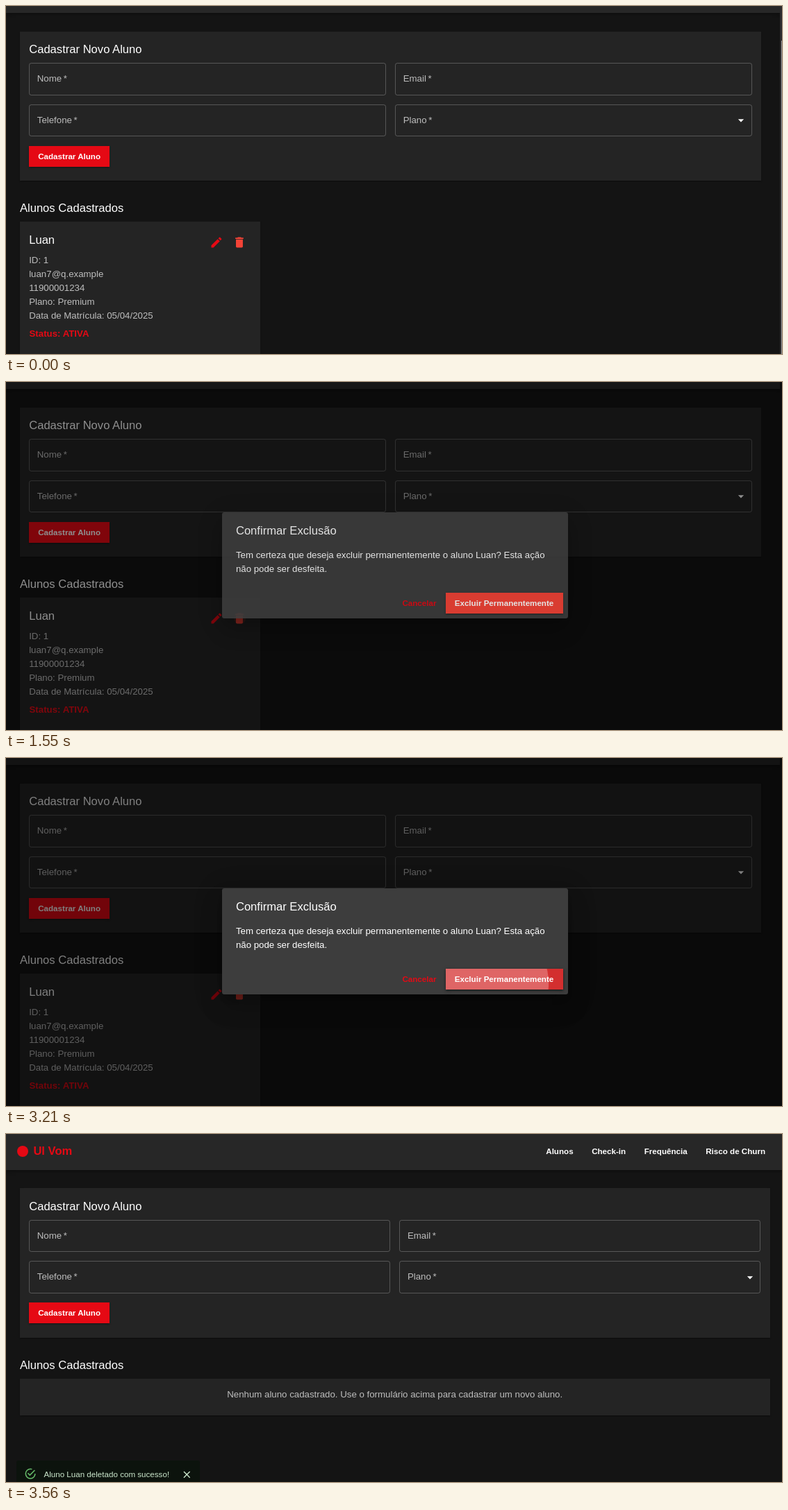
Write an HTML page that moves like this. It is 1117 px wide and 502 px high and loops after 6.09 s.

```html
<!DOCTYPE html>
<html lang="pt-BR">
<head>
<meta charset="utf-8">
<title>Cadastro de alunos</title>
<style>
  html, body { margin: 0; width: 100%; height: 100%; overflow: hidden; background: #141414; }
  body { position: relative; color: #fff; font: 13.28px/20px Arial, "Liberation Sans", sans-serif; }
  div, svg, .abs { position: absolute; white-space: pre; }
  svg { fill: currentColor; width: 19.92px; height: 19.92px; }
  [hidden] { display: none !important; }

  #page { left: 0; top: 0; width: 1113.5px; height: 600px; }
  .bar { left: 0; right: 0; top: 0; height: 51.5px; background: #272727;
    box-shadow: 0 1.7px 3.3px -.8px rgba(0,0,0,.2), 0 3.3px 4.2px rgba(0,0,0,.14), 0 .8px 8.3px rgba(0,0,0,.12); }
  .mark { left: 15.5px; top: 17px; width: 16px; height: 16px; border-radius: 50%; background: #e50914; }
  .brand { left: 39.4px; top: 15px; font-size: 16.6px; font-weight: bold; color: #e50914; }
  nav { position: absolute; right: 33px; top: 15px; display: flex; gap: 26.56px; white-space: pre; }
  nav, .btn, .flat { font-size: 11.62px; font-weight: bold; }
  .paper { left: 19.92px; right: 26.5px; background: #242424;
    box-shadow: 0 1.7px .8px -.8px rgba(0,0,0,.2), 0 .8px .8px rgba(0,0,0,.14), 0 .8px 2.5px rgba(0,0,0,.12); }
  .h6 { font-size: 16.6px; line-height: 26px; }
  .grid { left: 13.28px; right: 13.28px; top: 45.6px; display: grid;
    grid-template-columns: 1fr 1fr; gap: 13.28px; }
  .field { position: relative; box-sizing: border-box; height: 46.5px; border: 1px solid rgba(255,255,255,.23);
    border-radius: 3.3px; padding-left: 10.6px; line-height: 44px; color: rgba(255,255,255,.7); }
  .field i { font-style: normal; margin-left: .2em; }
  .field svg { right: 4.8px; top: 12.3px; color: #fff; }
  .btn { height: 30.3px; line-height: 30px; padding: 0 13px; background: #e50914;
    box-shadow: 0 2.5px .8px -1.7px rgba(0,0,0,.2), 0 1.7px 1.7px rgba(0,0,0,.14), 0 .8px 4.2px rgba(0,0,0,.12); }
  .soft { color: rgba(255,255,255,.7); }
  .round { width: 33.2px; height: 33.2px; border-radius: 50%; overflow: hidden; }
  .round svg { left: 6.64px; top: 6.64px; }
  .wave { border-radius: 50%; background: currentColor; opacity: 0; }

  #track { left: 1113.5px; top: 0; width: 12.5px; height: 100%; background: #2c2c2c; }
  #track div { left: 2.5px; top: 50px; width: 7px; bottom: 0; background: #9f9f9f; }
  #shade { inset: 0; background: rgba(0,0,0,.5); }
  #dialog { left: 311px; top: 188px; width: 497.5px; height: 153px; border-radius: 3.3px; background: #3d3d3d;
    box-shadow: 0 9.1px 12.5px -5.8px rgba(0,0,0,.2), 0 20px 31.5px 2.5px rgba(0,0,0,.14), 0 7.5px 38px 6.6px rgba(0,0,0,.12); }
  #del { left: 322px; top: 116px; width: 169px; padding: 0; overflow: hidden; }
  #lift { left: 322px; top: 116px; width: 169px; height: 30.3px;
    box-shadow: 0 1.7px 3.3px -.8px rgba(0,0,0,.2), 0 3.3px 4.2px rgba(0,0,0,.14), 0 .8px 8.3px rgba(0,0,0,.12); }
  #snack { left: 15px; top: 471px; width: 264px; height: 39px; border-radius: 3.3px;
    background: #0c130d; color: #cce8cd; font-size: 11.62px; }
</style>
</head>
<body>
<div id="page">
  <div class="bar">
    <div class="mark"></div>
    <div class="brand">Ul Vom</div>
    <nav><span>Alunos</span><span>Check-in</span><span>Frequência</span><span>Risco de Churn</span></nav>
  </div>
  <div class="paper" style="top:78px;height:215.5px">
    <div class="h6" style="left:13.28px;top:13.5px">Cadastrar Novo Aluno</div>
    <div class="grid">
      <span class="field">Nome<i>*</i></span>
      <span class="field">Email<i>*</i></span>
      <span class="field">Telefone<i>*</i></span>
      <span class="field">Plano<i>*</i><svg viewBox="0 0 24 24"><path d="M7 10l5 5 5-5z"/></svg></span>
    </div>
    <div class="btn" style="left:13.28px;top:165.2px">Cadastrar Aluno</div>
  </div>
  <div class="h6" style="left:19.92px;top:320.5px">Alunos Cadastrados</div>

  <div class="paper" id="card" style="top:352.5px;width:346.5px;height:200px">
    <div class="h6" style="left:13.28px;top:14px">Luan</div>
    <div class="soft" style="left:13.28px;top:46px;line-height:19.92px">ID: 1
luan7@q.example
11900001234
Plano: Premium
Data de Matrícula: 05/04/2025</div>
    <div style="left:13.6px;top:152px;font-weight:bold;color:#e50914">Status: ATIVA</div>
    <div class="round" style="left:266.6px;top:13.3px;color:#e50914">
      <svg viewBox="0 0 24 24"><path d="M3 17.25V21h3.75L17.81 9.94l-3.75-3.75zM20.71 7.04c.39-.39.39-1.02 0-1.41l-2.34-2.34a.996.996 0 0 0-1.41 0l-1.83 1.83 3.75 3.75z"/></svg>
    </div>
    <div class="round" id="trash" style="left:299.9px;top:13.3px;color:#f44336">
      <svg viewBox="0 0 24 24"><path d="M6 19c0 1.1.9 2 2 2h8c1.1 0 2-.9 2-2V7H6zM19 4h-3.5l-1-1h-5l-1 1H5v2h14z"/></svg>
      <div class="wave" id="tap" style="inset:0"></div>
    </div>
  </div>

  <div class="paper" id="empty" style="top:352.5px;height:53px">
    <div class="soft" style="left:0;right:0;top:13.3px;text-align:center">Nenhum aluno cadastrado. Use o formulário acima para cadastrar um novo aluno.</div>
  </div>
</div>
<div id="track"><div></div></div>

<div id="shade"></div>
<div id="dialog">
  <div class="h6" style="left:19.92px;top:13.5px">Confirmar Exclusão</div>
  <div id="ask" style="left:19.92px;top:52px"></div>
  <div class="flat" style="left:259.4px;top:121px;color:#e50914">Cancelar</div>
  <div id="lift"></div>
  <div class="btn" id="del">
    <div class="wave" id="ripple" style="left:-52px;top:-91px;width:224px;height:224px"></div>
    <div style="left:12.7px;top:0">Excluir Permanentemente</div>
  </div>
</div>

<div id="snack">
  <svg viewBox="0 0 24 24" style="left:11.4px;top:10.4px;width:18.2px;height:18.2px;color:#66bb6a"><path d="M20,12A8,8 0 0,1 12,20A8,8 0 0,1 4,12A8,8 0 0,1 12,4C12.76,4 13.5,4.11 14.2,4.31L15.77,2.74C14.61,2.26 13.34,2 12,2A10,10 0 0,0 2,12A10,10 0 0,0 12,22A10,10 0 0,0 22,12M7.91,10.08L6.5,11.5L11,16L21,6L19.59,4.58L11,13.17L7.91,10.08Z"/></svg>
  <div style="left:39.4px;top:9.5px">Aluno Luan deletado com sucesso!</div>
  <svg viewBox="0 0 24 24" style="left:237.2px;top:11.7px;width:16.6px;height:16.6px"><path d="M19 6.41L17.59 5 12 10.59 6.41 5 5 6.41 10.59 12 5 17.59 6.41 19 12 13.41 17.59 19 19 17.59 13.41 12z"/></svg>
</div>

<script>
const LOOP = 6090;
// Moments at which the picture is refreshed; it holds still in between.
const TICKS = [0, 810, 1410, 1480, 1550, 1620, 1690, 1760, 2660, 2730, 2800, 2870,
  3000, 3070, 3140, 3210, 3280, 3350, 3420, 3490, 3560];
const OPEN = 1412, CLOSE = 3225, DELETED = 3284, UNLOCK = 3490;
const ASK = 'Tem certeza que deseja excluir permanentemente o aluno ';
const $ = id => document.getElementById(id);
const mix = (a, b, p) => a + (b - a) * p;

// cubic-bezier(.4, 0, .2, 1)
function ease(x) {
  if (x <= 0) return 0;
  if (x >= 1) return 1;
  let lo = 0, hi = 1;
  for (let i = 0; i < 24; i++) {
    const u = (lo + hi) / 2, v = 1 - u;
    if (1.2 * u * v * v + .6 * u * u * v + u * u * u < x) lo = u; else hi = u;
  }
  return 3 * lo * lo * (1 - lo) + lo * lo * lo;
}

function wave(el, t, down, up) {
  const p = ease((t - down) / 550);
  el.style.transform = `scale(${p})`;
  el.style.opacity = t < down ? 0 : mix(.1, .3, p) * (1 - ease((t - up) / 550));
}

function draw(t) {
  const gone = t >= DELETED;
  $('page').style.top = gone ? '0px' : '-41.5px';
  $('page').style.width = (t >= UNLOCK ? 1126 : 1113.5) + 'px';
  $('card').hidden = gone;
  $('empty').hidden = !gone;
  $('track').hidden = t >= OPEN;

  $('trash').style.background = t >= 810 && t < 1550 ? 'rgba(244,67,54,.08)' : 'none';
  wave($('tap'), t, 1350, 1410);

  const shown = ease((t - OPEN) / 225) * (1 - ease((t - CLOSE) / 195));
  $('shade').style.opacity = $('dialog').style.opacity = shown;
  const ask = ASK + (t < CLOSE ? 'Luan? Esta ação\nnão pode' : '? Esta ação não\npode') + ' ser desfeita.';
  if ($('ask').textContent !== ask) $('ask').textContent = ask;

  const hover = ease((t - 2630) / 250);
  $('del').style.background = `rgb(${mix(244, 211, hover)},${mix(67, 47, hover)},${mix(54, 47, hover)})`;
  $('lift').style.opacity = hover;
  wave($('ripple'), t, 2930, CLOSE);

  const grow = ease((t - DELETED) / 136);
  $('snack').style.opacity = ease((t - DELETED) / 204);
  $('snack').style.transform = `scale(${mix(.75, 1, grow)},${mix(.5625, 1, grow)})`;
}

const start = performance.now();
function frame() {
  const now = (performance.now() - start) % LOOP;
  draw(TICKS.findLast(k => k <= now));
  requestAnimationFrame(frame);
}
frame();
</script>
</body>
</html>
```
